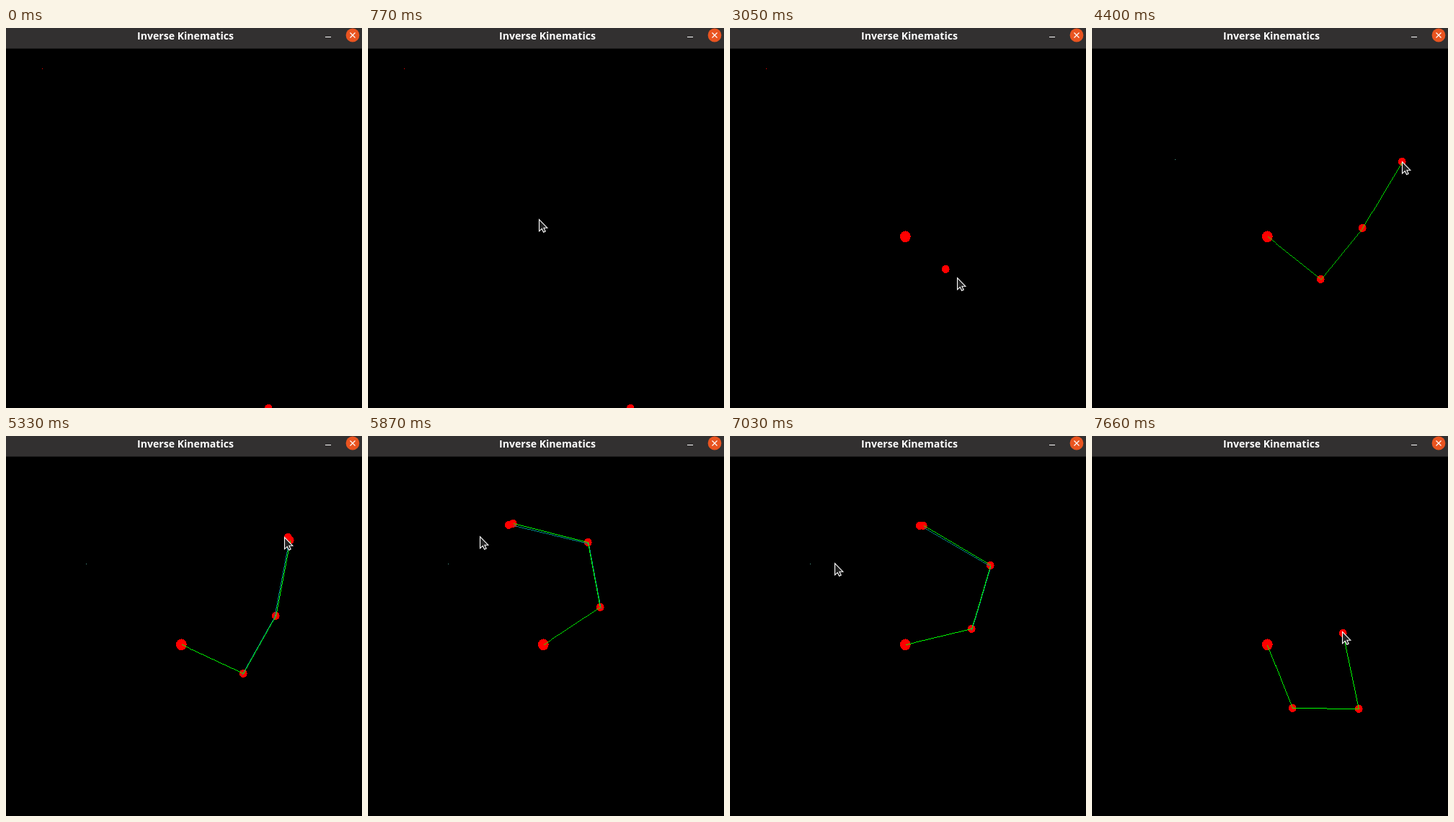
An HTML page that plays this animation: 494x527 px, repeating every 8 s.

```html
<!DOCTYPE html>
<html lang="en">
<head>
<meta charset="utf-8">
<title>Inverse Kinematics</title>
<style>
  html, body { margin: 0; width: 100%; height: 100%; overflow: hidden; background: #000; }
  svg { display: block; width: 100vw; height: 100vh; }
  text { font: bold 14.1px "Open Sans", "Noto Sans", sans-serif; fill: #fff; }
</style>
</head>
<body>
<svg viewBox="0 0 494 527">
  <rect width="494" height="527"/>
  <g shape-rendering="crispEdges">
    <rect id="marker" width="1" height="1"/>
    <g id="dots" fill="#f00"></g>
    <g id="ghost" stroke="#008b8b"></g>
    <g id="arm" stroke="#0f0"></g>
  </g>
  <path id="cursor" d="M.5 .5V16.8L4.2 13.4L6.6 18.3L9.2 17L6.9 12.2H11.8Z" fill="#222" stroke="#fff" stroke-width="1.1"/>
  <rect width="494" height="28" fill="#323030"/>
  <rect y="28" width="494" height="1" fill="#1c1b1b"/>
  <text x="249" y="16" text-anchor="middle">Inverse Kinematics</text>
  <path d="M443 12.5H451" stroke="#fff"/>
  <circle cx="481" cy="10" r="9.4" fill="#e95420"/>
  <path d="M477.5 6.5L484.5 13.5M484.5 6.5L477.5 13.5" stroke="#fff" stroke-width="1.2"/>
</svg>
<script>
const LOOP = 8000, STEP = 77, RAD = Math.PI / 180;
const DRAG_START = 4900, DRAG_END = 7623;
const LENGTHS = [94.6, 91.8, 107.3];
const JOINTS = [[243, 289], [317, 348], [375, 277], [430, 185]];
const CLICKS = [2350, 3360, 3840, 4380];
const BASE = JOINTS[0];

const linear = u => u;
const speedUp = u => u * u;

// Moves are [from, to, values, ease]; values rest between moves.
const POINTER = [
  [70, 850, [219, 237]],
  [940, 1090, [198, 250]],
  [1090, 1440, [251, 255]],
  [1780, 2350, JOINTS[0]],
  [2656, 3013, JOINTS[1]],
  [3430, 3755, JOINTS[2]],
  [3910, 4310, JOINTS[3]]
];
// Three link angles, then pointer angle and radius around the base.
const GRAB = [38.6, -50.8, -59.1, -29.1, 214];
const DRAG = [
  [DRAG_START, 5852, [-33.4, -100.7, -166.4, -120.4, 174], speedUp],
  [5852, 6468, [-160.4, -220, -296.3, -280.4, 149.5]],
  [6468, 7440, [-545, -605, -681, -660, 150]],
  [7440, DRAG_END, [-652, -719.4, -822.2, -729.8, 105.5]]
];
const MARKER = [[3510, 4389, [115, 182]], [DRAG_START, 4928, [111, 177]]];

const el = id => document.getElementById(id);
const set = (node, attrs) => { for (const k in attrs) node.setAttribute(k, attrs[k]); };
const make = (parent, tag, count) => Array.from({ length: count }, () =>
  el(parent).appendChild(document.createElementNS("http://www.w3.org/2000/svg", tag)));
const shift = ([x, y], dx, dy) => [x + dx, y + dy];
const polar = ([x, y], deg, r) => [x + r * Math.cos(deg * RAD), y + r * Math.sin(deg * RAD)];

function follow(start, moves, t) {
  return moves.reduce((now, [from, to, values, ease = linear]) => {
    const u = ease(Math.min(1, Math.max(0, (t - from) / (to - from))));
    return now.map((v, i) => v + (values[i] - v) * u);
  }, start);
}

function pointerAt(t) {
  if (t < DRAG_START) return follow([393, 512], POINTER, t);
  const [, , , angle, radius] = follow(GRAB, DRAG, t);
  return polar(BASE, angle, radius);
}

function jointsAt(t) {
  if (t < DRAG_START) return JOINTS.filter((_, i) => t >= CLICKS[i]);
  const angles = follow(GRAB, DRAG, t), joints = [BASE];
  LENGTHS.forEach((len, i) => joints.push(polar(joints[i], angles[i], len)));
  return joints;
}

const dots = make("dots", "ellipse", 5);
const armLines = make("arm", "line", 3);
const ghostLines = make("ghost", "line", 2);

// Stroke width keeps each line one pixel thick along its minor axis.
function drawChain(lines, points) {
  lines.forEach((line, i) => {
    if (!points[i + 1]) return set(line, { visibility: "hidden" });
    const [[x1, y1], [x2, y2]] = [points[i], points[i + 1]].map(p => p.map(v => Math.round(v) + 0.5));
    const dx = Math.abs(x2 - x1), dy = Math.abs(y2 - y1);
    set(line, { x1, y1, x2, y2, "stroke-width": Math.max(dx, dy) / Math.hypot(dx, dy), visibility: "visible" });
  });
}

function draw(time) {
  const t = Math.floor(time / STEP) * STEP;
  const pointer = pointerAt(t), joints = jointsAt(t), balls = joints.slice();
  let ghost = [];

  if (!joints.length) balls.push([364, 527]);
  else if (joints.length < 4) balls.push(pointerAt(t - STEP));

  if (t >= DRAG_START && t < DRAG_END) {
    // The goal leads the tip around the base; the ghost lies slightly inward.
    const tip = joints[3];
    const rx = tip[0] - BASE[0], ry = tip[1] - BASE[1], r = Math.hypot(rx, ry);
    const lead = 5.4 / r, inward = -2.6 / r;
    balls.push(shift(tip, ry * lead, -rx * lead));
    ghost = joints.slice(1).map(p => shift(p, rx * inward, ry * inward));
  }

  dots.forEach((dot, i) => {
    const size = !balls[i] ? 0 : i === 0 && joints.length ? 7.4 : 5.3;
    const [cx, cy] = (balls[i] || BASE).map(v => Math.round(v) + 0.3);
    set(dot, { cx, cy, rx: size, ry: size * 1.07 });
  });
  drawChain(armLines, joints);
  drawChain(ghostLines, ghost);
  set(el("cursor"), {
    transform: `translate(${pointer.map(Math.round)})`,
    visibility: t < 70 ? "hidden" : "visible"
  });

  const early = t < CLICKS[1];
  const [x, y] = early ? [50, 56] : follow([66, 101], MARKER, t).map(Math.round);
  const shown = early || (t >= 3510 && t < 7510);
  set(el("marker"), { x, y, fill: early ? "#f00" : "#4c9c8c", visibility: shown ? "visible" : "hidden" });
}

const start = performance.now();
function tick() {
  draw((performance.now() - start) % LOOP);
  requestAnimationFrame(tick);
}
tick();
</script>
</body>
</html>
```
